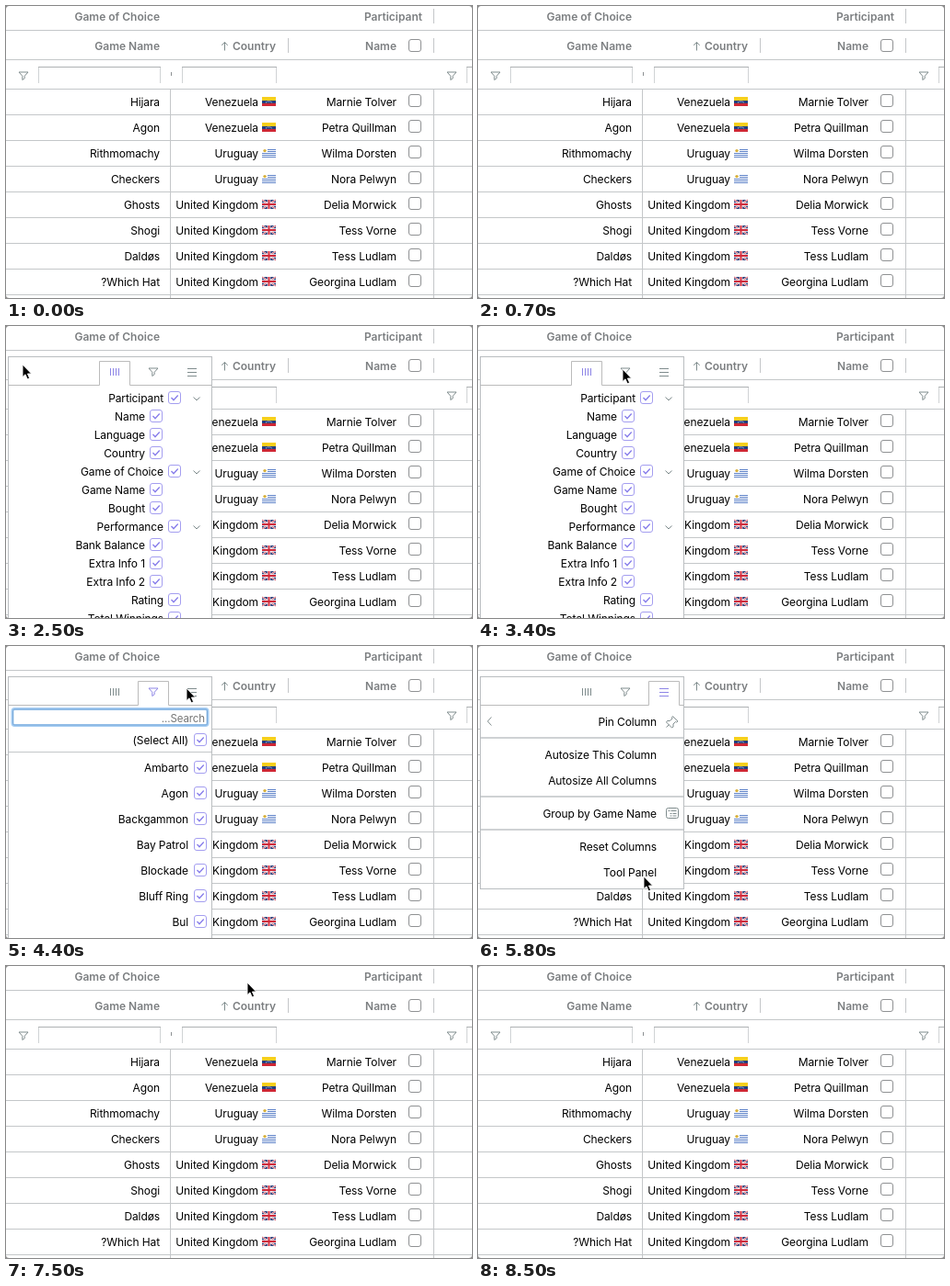
An HTML page that plays this animation: 506x318 px, repeating every 8600 ms.

```html
<!DOCTYPE html>
<html lang="en">
<head>
<meta charset="utf-8">
<style>
  html, body { margin: 0; width: 100%; height: 100%; overflow: hidden; background: #8a8a8a; }
  svg { display: block; font: 12px Inter, "Open Sans", sans-serif; }
  text { fill: #000; text-anchor: end; letter-spacing: -.1px; }
  .head { fill: #7b7e80; font-weight: 600; letter-spacing: 0; }
  .hint { fill: #757575; font-size: 11.5px; }
  .icon { fill: none; stroke: #7f8c8d; }
  .on { stroke: #8d85e6; }
  .pale { stroke: #bbb; }
</style>
</head>
<body>
<svg id="stage" width="506" height="318" viewBox="0 0 506 318"></svg>
<script>
const LOOP = 8600, STEP = 100, GRID = '#c4c7c9';

const rect = (x, y, w, h, fill) => `<rect x="${x}" y="${y}" width="${w}" height="${h}" fill="${fill}"/>`;
const hline = (x, y, w, color = GRID) => rect(x, y, w, 1, color);
const vline = (x, y, h, color = GRID) => rect(x, y, 1, h, color);
const text = (s, x, y, cls = '') => `<text x="${x}" y="${y + 4.5}" class="${cls}">${s}</text>`;
const path = (d, cls = '') => `<path class="icon ${cls}" d="${d}"/>`;

const box = (x, y) =>
  `<rect x="${x - 6.5}" y="${y - 6.5}" width="13" height="13" rx="2.5" fill="#fff" stroke="#8f9193"/>`;
const checked = (x, y) =>
  `<rect x="${x - 6.5}" y="${y - 6.5}" width="13" height="13" rx="2.5" fill="#fff" stroke="#a49ef0"/>` +
  `<path d="M${x - 3.5} ${y}l2.5 2.7 4.7-5.2" fill="none" stroke="#857bea" stroke-width="1.3"/>`;
const funnel = (x, y, cls) => path(`M${x - 5} ${y - 4}h10l-3.8 4.3v2.4l-2.4 1.8v-4.2z`, cls);
const bars = (x, y, cls) => path(`M${x - 5} ${y - 3.5}h10m-10 4h10m-10 4h10`, cls);
const columns = (x, y, cls) => path(`M${x - 4.5} ${y - 4}v8m3-8v8m3-8v8m3-8v8`, cls);
const input = (x, w) =>
  hline(x, 66, w, '#aeb1b3') + vline(x, 67, 17, '#d0d3d5') + vline(x + w - 1, 67, 17, '#d0d3d5');

const flags = {
  Venezuela: rect(0, 0, 15, 4, '#f7cf1d') + rect(0, 4, 15, 3, '#24407f') + rect(0, 7, 15, 3, '#cf2734') +
    '<path d="M4 6.2Q7.5 3.6 11 6.2" fill="none" stroke="#fff" stroke-dasharray="1 1"/>',
  Uruguay: rect(0, 0, 15, 10, '#fff') + [1, 3, 5, 7, 9].map(y => rect(0, y, 15, 1, '#5f83c9')).join('') +
    rect(0, 0, 6, 5, '#fff') + '<circle cx="3" cy="2.6" r="1.7" fill="#d9b13b"/>',
  'United Kingdom': rect(0, 0, 15, 10, '#293c78') +
    '<path d="M0 0L15 10M15 0L0 10" stroke="#fff" stroke-width="2"/>' +
    '<path d="M0 0L15 10M15 0L0 10" stroke="#cf2b3c" stroke-width=".8"/>' +
    '<path d="M7.5 0V10M0 5H15" stroke="#fff" stroke-width="3.4"/>' +
    '<path d="M7.5 0V10M0 5H15" stroke="#cf2b3c" stroke-width="2"/>'
};

const rows = [
  ['Hijara', 'Venezuela', 'Marnie Tolver'],
  ['Agon', 'Venezuela', 'Petra Quillman'],
  ['Rithmomachy', 'Uruguay', 'Wilma Dorsten'],
  ['Checkers', 'Uruguay', 'Nora Pelwyn'],
  ['Ghosts', 'United Kingdom', 'Delia Morwick'],
  ['Shogi', 'United Kingdom', 'Tess Vorne'],
  ['Daldøs', 'United Kingdom', 'Tess Ludlam'],
  ['?Which Hat', 'United Kingdom', 'Georgina Ludlam']
];

function grid() {
  const head =
    text('Game of Choice', 167, 11, 'head') + text('Participant', 452, 11, 'head') +
    text('Game Name', 167, 43, 'head') + text('Country', 293, 43, 'head') + text('Name', 424, 43, 'head') +
    path('M237.5 48.5v-9m-3.2 3.3l3.2-3.3 3.2 3.3') + box(444, 43) +
    vline(464, 3, 16) + vline(306, 35, 16) + vline(464, 35, 16) +
    [26, 58, 90].map(y => hline(0, y, 506)).join('') +
    funnel(19, 76) + funnel(484, 76) +
    input(35, 133) + input(191, 103) + input(500, 20) + vline(179, 72, 4, '#8d9092');
  const body = rows.map(([game, country, name], i) => {
    const y = 104 + 28 * i;
    return text(game, 167, y) + text(country, 274, y) + text(name, 424, y) + box(444, y - 1) +
      `<g transform="translate(278 ${y - 5})">${flags[country]}</g>` + hline(0, y + 14, 506);
  }).join('');
  return head + body + vline(178, 91, 227) + vline(464, 91, 227);
}

function columnsTab() {
  const list = ['+Participant', 'Name', 'Language', 'Country', '+Game of Choice', 'Game Name', 'Bought',
    '+Performance', 'Bank Balance', 'Extra Info 1', 'Extra Info 2', '-Rating', '-Total Winnings'];
  return list.map((label, i) => {
    const y = 78 + 20 * i, top = /^[+-]/.test(label), x = top ? 183 : 163;
    return text(label.replace(/^[+-]/, ''), x - 12, y) + checked(x, y) +
      (label[0] == '+' ? path(`M203.5 ${y - .5}l3.5 3.5 3.5-3.5`) : '');
  }).join('');
}

function filterTab() {
  const list = ['Ambarto', 'Agon', 'Backgammon', 'Bay Patrol', 'Blockade', 'Bluff Ring', 'Bul'];
  return '<rect x="7" y="68.5" width="212" height="18" rx="2.5" fill="#fff" stroke="#a5cdf3" stroke-width="3"/>' +
    '<rect x="7.5" y="69" width="211" height="17" rx="1.5" fill="none" stroke="#7ba9d8"/>' +
    text('...Search', 216, 78, 'hint') +
    text('(Select All)', 198, 102) + checked(211, 102) + hline(3, 115, 220) +
    list.map((s, i) => text(s, 198, 132 + 28 * i) + checked(211, 132 + 28 * i)).join('');
}

function menuTab() {
  const items = { 'Pin Column': 82, 'Autosize This Column': 118, 'Autosize All Columns': 146,
    'Group by Game Name': 182, 'Reset Columns': 218, 'Tool Panel': 246 };
  return Object.entries(items).map(([s, y]) => text(s, 194, y)).join('') +
    [99, 163, 199].map(y => rect(3, y, 220, 2, '#cfd2d4')).join('') +
    path('M14.5 77.5l-4 4.5 4 4.5') +
    path('M211.5 76.5l5.5 5.5-1.5 1-1-.5-2.5 2.5v3l-1.5 1-6-6 1-1.5h3l2.5-2.5-.5-1zM207.500 85.500l-3 3') +
    '<rect class="icon" x="204.500" y="176.500" width="13" height="11" rx="2"/>' +
    path('M206.5 179.500h2m1 0h6M208.500 182.500h2m1 0h4M208.500 185h2m1 0h4');
}

function popup(active, content, bottom) {
  const x = 101.5 + 42 * active;
  const icons = [columns, funnel, bars].map((draw, i) => draw(118 + 42 * i, 50, i == active ? 'on' : ''));
  return `<g class="popup"><rect x="2.500" y="33.500" width="221" height="${bottom - 33}" fill="#fff" stroke="#b9bdc0"/>` +
    path(`M3 64.500H${x}V38.500h33V64.500H223`, 'pale') + icons.join('') + content + '</g>';
}

const stage = document.getElementById('stage');
stage.innerHTML = '<rect width="506" height="318" rx="3.500" fill="#fff"/>' + grid() +
  `<g id="handle">${bars(19, 43, 'pale')}</g>` +
  popup(0, columnsTab(), 330) + popup(1, filterTab(), 330) + popup(2, menuTab(), 264) +
  '<path id="cursor" d="M0 0V13.500L3 10.800 5.200 15.800 7.600 14.800 5.400 10H9.600Z" fill="#000" stroke="#fff" stroke-width=".9"/>';

const popups = document.querySelectorAll('.popup');
const handle = document.getElementById('handle');
const cursor = document.getElementById('cursor');

// Pointer stops: time, x, y
const stops = [
  [900, 150, 330], [1100, 120, 150], [1200, 120, 150], [1700, 27, 41], [2000, 18, 42], [2600, 18, 42],
  [3400, 157, 47], [3900, 157, 47], [4400, 196, 46], [5200, 198, 48], [5800, 180, 251],
  [6200, 180, 251], [6700, 193, 62], [7100, 197, 50], [7500, 262, 18], [7900, 262, 18], [8300, 300, -25]
];
// Start of each tab, then closing time
const opens = [2300, 3600, 4800, 7300];

function pointer(t) {
  const i = stops.findIndex(s => s[0] > t);
  if (i < 1) return stops[i ? stops.length - 1 : 0].slice(1);
  const [a, b] = [stops[i - 1], stops[i]];
  const u = (t - a[0]) / (b[0] - a[0]), k = u * u * (3 - 2 * u);
  return [a[1] + (b[1] - a[1]) * k, a[2] + (b[2] - a[2]) * k];
}

const show = (el, on) => el.style.display = on ? '' : 'none';

function frame(now) {
  const t = Math.floor(now % LOOP / STEP) * STEP;
  popups.forEach((p, i) => show(p, t >= opens[i] && t < opens[i + 1]));
  show(handle, t >= 1500 && t < 7300);
  cursor.setAttribute('transform', `translate(${pointer(t)})`);
  requestAnimationFrame(frame);
}
requestAnimationFrame(frame);
</script>
</body>
</html>
```
